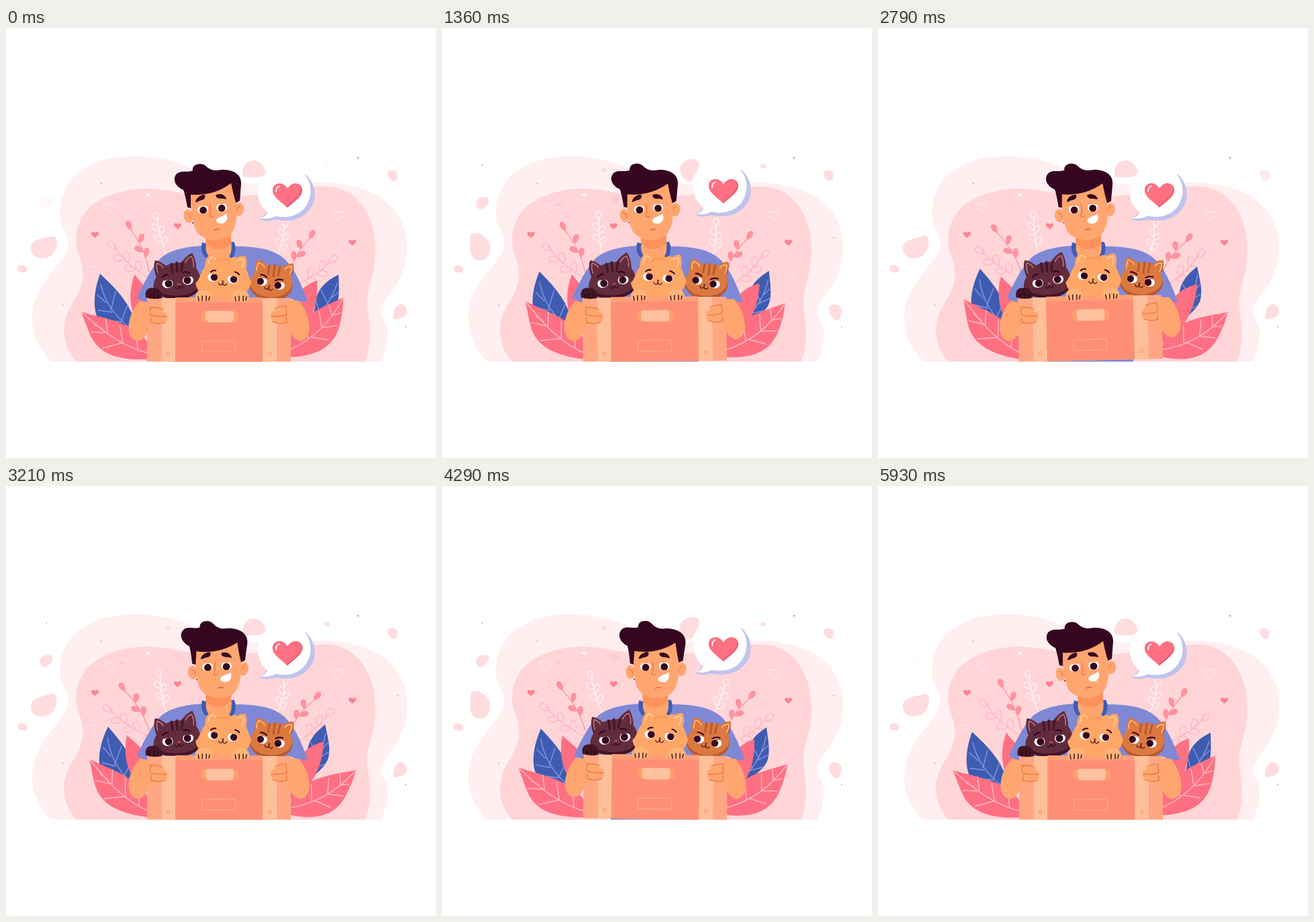
Write an HTML page with a canvas that moves like this. It is 640 px wide and 640 px high and loops after 6000 ms.

```html
<!DOCTYPE html>
<html lang="en">
<head>
<meta charset="utf-8">
<title>Kittens in a box</title>
<style>
html, body { margin: 0; width: 100%; height: 100%; overflow: hidden; background: #fff; }
canvas { display: block; width: 640px; height: 640px; }
</style>
</head>
<body>
<canvas id="stage" width="640" height="640"></canvas>
<script>
const ctx = document.getElementById('stage').getContext('2d');
const LOOP = 6000, HALF = 3000, TAU = Math.PI * 2;
const DARK = '#360520', SKIN = '#ffa670', SHADE = '#ff925a', FOLD = '#f4733f';
const BLUE = '#3e5cb2', SHIRT = '#7f88d5', ROSE = '#ff6f82', PALE = '#ffdcdf';

const cache = new Map();
function path(d) {
  if (!cache.has(d)) cache.set(d, new Path2D(d));
  return cache.get(d);
}
function fill(color, d) {
  ctx.fillStyle = color;
  ctx.fill(path(d));
}
function line(color, w, d) {
  ctx.strokeStyle = color;
  ctx.lineWidth = w;
  ctx.stroke(path(d));
}
function oval(color, x, y, rx, ry, deg = 0) {
  ctx.fillStyle = color;
  ctx.beginPath();
  ctx.ellipse(x, y, rx, ry, deg * TAU / 360, 0, TAU);
  ctx.fill();
}
function turn(x, y, deg, draw) {
  ctx.save();
  ctx.translate(x, y);
  ctx.rotate(deg * TAU / 360);
  ctx.translate(-x, -y);
  draw();
  ctx.restore();
}
function at(x, y, deg, scale, draw) {
  ctx.save();
  ctx.translate(x, y);
  ctx.rotate(deg * TAU / 360);
  ctx.scale(scale, scale);
  draw();
  ctx.restore();
}
// a shape with a darker rim along its lower edge
function shaded(rim, color, d) {
  fill(rim, d);
  ctx.save();
  ctx.clip(path(d));
  ctx.translate(0, -5);
  fill(color, d);
  ctx.restore();
}

const wave = (t, peak, span = LOOP) => Math.cos(TAU * (t - peak) / span);
const clamp = v => Math.max(0, Math.min(1, v));
const ease = v => v * v * (3 - 2 * v);
function keys(t, list) {
  let i = 0;
  while (i < list.length - 2 && t > list[i + 1][0]) i++;
  const [t0, a] = list[i], [t1, b] = list[i + 1];
  return a + (b - a) * ease(clamp((t - t0) / (t1 - t0)));
}
// 0 near the dip time, 1 away from it; repeats twice per loop
function fade(t, dip, hold = 60, ramp = 350) {
  const d = Math.abs(((t - dip) % HALF + HALF * 1.5) % HALF - HALF / 2);
  return ease(clamp((d - hold) / ramp));
}

const ROCK = [[0, 0], [1000, 0], [1800, -1.3], [2800, -1.3], [3600, 1.3], [3900, 1.3], [4700, 0], [6000, 0]];
const NOD = [[0, 0], [640, 2.2], [1930, 0], [2790, 0.8], [3600, 6], [3900, 6], [4790, 1.8], [6000, 0]];
const HEART = 'M0 9 C-4 5 -11 1 -11 -4 C-11 -10 -3 -11 0 -5 C3 -11 11 -10 11 -4 C11 1 4 5 0 9 Z';

function backdrop() {
  fill('#ffeff0', 'M67 496.500 C35 465 30 420 55 382 C75 350 95 340 92 315 C88 295 75 290 82 258 C92 210 140 191 190 191 C250 191 275 210 330 228 C390 238 420 230 470 230 C560 232 597 275 597 325 C597 370 575 390 563 408 C550 430 570 435 568 455 C568 475 563 485 559 496.500 Z');
  fill('#ffd5d8', 'M104 496.500 C82 470 82 440 96 415 C115 385 118 370 111 345 C100 320 103 295 118 274 C140 248 180 239 210 239 C240 240 260 246 290 250 C330 253 360 250 390 246 C420 240 455 235 480 236 C527 239 550 285 550 330 C550 370 536 385 538 415 C541 440 546 465 535 496.500 Z');
}

function speck(alpha, color, x, y, rx, ry = rx, deg = 0) {
  ctx.globalAlpha = alpha;
  oval(color, x, y, rx, ry, deg);
  ctx.globalAlpha = 1;
}

function confetti(t) {
  const swing = (1 - wave(t, 0, HALF)) / 2;
  turn(56, 327, -80 * swing, () => fill(PALE,
    'M37 326 C39 313 58 313 69 310 C78 309 77 322 74 329 C70 340 60 344 51 343 C41 341 36 335 37 326 Z'));
  turn(368, 211, -65 * swing, () => fill(PALE,
    'M352 217 C351 207 358 197 369 197 C379 198 386 207 386 215 C385 222 377 223 369 222 C362 221 353 225 352 217 Z'));
  turn(586, 423, -55 * swing, () => fill(PALE,
    'M576 427 C577 419 581 411 588 411 C594 411 597 418 597 424 C595 431 587 431 582 433 C578 434 575 432 576 427 Z'));
  const a = fade(t, 2840), b = fade(t, 2300, 280, 420), c = fade(t, 1830), d = fade(t, 680);
  ctx.globalAlpha = a;
  fill(PALE, 'M51 258 C53 252 62 250 69 253 C72 258 66 266 60 269 C53 272 50 265 51 258 Z');
  ctx.globalAlpha = 0.25 + 0.75 * b;
  fill(PALE, 'M568 215 C570 210 578 211 582 215 C584 222 581 228 577 228 C572 227 567 221 568 215 Z');
  ctx.globalAlpha = c;
  fill(PALE, 'M17 359 C18 352 24 351 29 355 C34 359 31 364 26 364 C21 364 17 363 17 359 Z');
  speck(a, PALE, 241, 211, 4, 3, 15);
  speck(a, PALE, 478, 205.5, 4, 3, 15);
  speck(a, '#ffc8cd', 174, 263.5, 4.5, 2.5, 10);
  speck(a, '#ffcdd1', 257, 255, 7, 6);
  speck(1 - c, '#ffc8cd', 390, 289.5, 4, 3);
  speck(1, '#fff0f1', 212, 248.5, 3.5, 2.4);
  speck(a, '#d3a9b3', 60, 204, 1.1);
  speck(a, '#d3a9b3', 583, 312, 1.1);
  speck(d, '#b8929f', 524, 193.3, 1.2);
  speck(d, '#d3a9b3', 142, 231, 1.1);
  speck(0.3 + 0.7 * c, '#d3a9b3', 84.5, 412.5, 1.1);
  speck(c, '#d3a9b3', 595, 444.5, 1.1);

  const early = 1 - fade(t, 680), late = 1 - fade(t, 1850);
  const small = (x, y, r) => at(x, y, r, 0.5, () => fill('#ff8290', HEART));
  small(132.5, 308, -16 * early);
  small(255.5, 295, -16 * late);
  small(515.5, 319.5, 14 * early);
  const hollow = (x, y, r, s) => at(x, y, r, s, () => line('#ffecee', 1.5, HEART));
  hollow(154, 268, -8 * early, 0.72);
  hollow(494, 279.5, 14 * late, 0.74);
  hollow(128, 360.5, 8 * early, 0.58);
  hollow(519, 372, -8 * late, 0.58);
}

// each sprig: place along the stem, tilt in radians
const SOLID = [[0.3, 0.6], [0.42, -0.6], [0.62, 0.75], [0.94, 0]];
const HOLLOW = [[0.24, 0.65], [0.34, -0.65], [0.54, 0.6], [0.64, -0.6], [0.9, -0.05]];

function twig(x, y, len, deg, bend, color, sprigs, size) {
  at(x, y, deg, 1, () => {
    ctx.strokeStyle = color;
    ctx.fillStyle = color;
    ctx.lineWidth = 1.3;
    ctx.beginPath();
    ctx.moveTo(0, 0);
    ctx.quadraticCurveTo(bend, -len / 2, 0, -len);
    ctx.stroke();
    for (const [u, tilt] of sprigs) {
      ctx.save();
      ctx.translate(2 * u * (1 - u) * bend, -len * u);
      ctx.rotate(tilt * (bend < 0 && sprigs === SOLID ? -1 : 1));
      ctx.beginPath();
      ctx.moveTo(0, 0);
      ctx.bezierCurveTo(-size * 0.42, -size * 0.4, -size * 0.32, -size, 0, -size);
      ctx.bezierCurveTo(size * 0.32, -size, size * 0.42, -size * 0.4, 0, 0);
      sprigs === HOLLOW ? ctx.stroke() : ctx.fill();
      ctx.restore();
    }
  });
}

function plants(t) {
  const lean = 1 - wave(t, 250);
  twig(213, 363, 72, -24 - 4.4 * lean, 9, '#ff929e', SOLID, 15);
  twig(214, 373, 74, -47 - 4 * lean, -9, '#ffb5bd', HOLLOW, 16);
  twig(238, 336, 56, -10.5 + 7.5 * wave(t, 1900), -4, '#fff3f3', HOLLOW, 13);
  twig(402, 342, 51, 14 - 8 * wave(t, 1600), 5, '#fff3f3', HOLLOW, 13);
  twig(423, 365, 62, 30 + 4.2 * lean, -9, '#ff929e', SOLID, 15);
  twig(430, 383, 67, 51 - 6.5 * wave(t, 2150), 8, '#ffb5bd', HOLLOW, 16);

  const sway = 1 - wave(t, 0);
  turn(215, 470, 3.2 * sway, () => {
    fill(BLUE, 'M140 366 C157 382 186 407 194 445 L207 470 C188 448 147 446 136 431 C128 411 133 385 140 366 Z');
    line('#8996dc', 1.4, 'M141 382 C148 410 163 432 198 457 M149 409 L136 397 M158 423 L137 420 M170 437 L146 436 M156 420 L163 393 M171 438 L181 412');
  });
  turn(420, 472, -5.2 * sway, () => {
    fill(BLUE, 'M495 367 C475 377 460 391 460 415 C458 432 440 450 424 466 C455 440 478 436 490 418 C498 404 495 382 495 367 Z');
    line('#8996dc', 1.4, 'M493 380 C485 405 470 427 432 456 M484 402 L494 394 M477 414 L493 408 M464 428 L484 425 M479 411 L469 390 M467 425 L461 405');
  });
  turn(212, 450, -3.2 + 5.7 * wave(t, 850), () =>
    fill(ROSE, 'M191 367 C199 379 219 395 221 415 L216 455 C188 444 177 405 191 367 Z'));
  turn(424, 470, 4.6 * (wave(t, 2300) + 0.74), () =>
    fill(ROSE, 'M463 376 C444 382 429 397 422 421 L420 470 C452 451 466 412 463 376 Z'));

  turn(212, 487, 5.9 + 7.4 * wave(t, 2300), () => {
    fill(ROSE, 'M111 423 C143 433 196 437 216 476 L216 493 C175 495 144 490 128 463 C120 447 117 436 111 423 Z');
    line('#ffb8bf', 1.5, 'M112 424 C141 449 171 475 216 485 M143 448 L131 442 M150 454 L126 453 M172 469 L144 477 M151 454 L148 433 M174 470 L169 443 M196 479 L193 453');
  });
  turn(424, 487, 7.2 * sway, () => {
    fill(ROSE, 'M502 401 C474 415 433 428 420 464 L420 490 C456 489 484 479 495 448 C500 431 502 416 502 401 Z');
    line('#ffb8bf', 1.5, 'M501 403 C485 434 459 463 420 480 M485 428 L498 424 M470 446 L493 443 M453 460 L479 464 M485 428 L481 413 M470 446 L466 422 M450 463 L443 438');
  });
}

function bubble(t) {
  ctx.save();
  ctx.translate(0, -3.3 * (1 - wave(t, 0, HALF)));
  fill('#bfc3ee', 'M446 218 C458 228 463 246 457 262 C448 281 429 291 401 285 C392 288 384 288 378 285 L420 240 Z');
  fill('#fff', 'M415 205 C440 207 454 223 453.500 243 C452 272 428 286 401 280 C394 284 386 285 379 283 C385 281 388 278 389 274 C370 260 372 232 384 218 C392 209 403 205 415 205 Z');
  at(419, 249.5, 0, 2 * (1 + 0.12 * (1 - fade(t, 680, 80, 480))), () => {
    fill('#f2566e', HEART);
    ctx.save();
    ctx.clip(path(HEART));
    ctx.translate(-1, -0.7);
    fill('#ff7182', HEART);
    ctx.restore();
    line('#fff', 0.9, 'M-8.4 -3 C-8.6 -5 -7.5 -6.6 -6 -7');
  });
  ctx.restore();
}

// lower part of an ellipse under a flat lid, with the pupil cut by the lid
function eye(x, y, dx, dy, r = 6, tilt = 0) {
  ctx.save();
  ctx.beginPath();
  ctx.ellipse(x, y, r + 2, r + 0.6, tilt, -0.85, Math.PI + 0.85);
  ctx.closePath();
  ctx.fillStyle = '#fff';
  ctx.fill();
  ctx.clip();
  oval(DARK, x + dx, y + dy, r - 0.5, r - 0.5);
  ctx.restore();
}

function neck() {
  fill(SKIN, 'M297 300 L334 300 L336 335 C328 346 303 346 297 335 Z');
  fill(SHADE, 'M297 308 L335 306 L335 320 C324 333 307 332 298 321 Z');
  fill(BLUE, 'M292 319 L298 321 C296 331 299 337 305 344 L296 341 C290 334 290 326 292 319 Z');
  fill(BLUE, 'M335 319 L339 318 C343 325 342 334 338 341 L330 344 C335 337 337 329 335 319 Z');
}

function face() {
  oval(SKIN, 271.5, 280, 7, 10, -12);
  oval(SKIN, 347, 270, 7, 10, 8);
  line(FOLD, 1.2, 'M269 276 Q275 276 275 283 M348 265 Q343 267 343 274');
  fill(DARK, 'M270 267 C268 255 266 247 264 241 C252 236 247 225 254 217 C261 211 270 216 278 212 C276 203 290 199 297 205 C304 212 311 213 320 211 C336 210 350 216 350 231 L348 257 L341 261 L310 258 L276 268 Z');
  fill(SKIN, 'M275 248 C298 250 319 243 335 231 C337 241 340 253 342 259 C345 278 343 295 336 305 C324 319 300 319 286 306 C279 298 277 281 275 265 Z');
  eye(293, 270, 0.5, 1.2, 5.9, -0.12);
  eye(321, 267, 0, 1.2, 5.9, -0.05);
  fill(DARK, 'M282 259 C283 253 288 249 295 248 C298 250 296 255 292 256 C288 256 285 260 282 259 Z');
  fill(DARK, 'M313 248 C319 246 326 248 328 254 C327 256 324 253 319 254 C314 254 311 250 313 248 Z');
  line(FOLD, 1.4, 'M303 262 Q306 271 303 280 Q305 283 309 280');
  line('#d95e3c', 1.4, 'M310 301 Q314 298 318 300');
  fill('#fff', 'M313 286 C315 281 324 280 328 276 C331 283 328 291 321 291 C316 291 313 290 313 286 Z');
  oval(DARK, 278, 290, 0.9, 0.9);
}

function man(nod) {
  fill(SHIRT, 'M292 324 C262 326 239 332 227 346 C215 360 205 380 195 401 Q202 407 212 408 L240 410 L250 500 L382 500 L400 410 L424 403 Q438 409 449 407 C438 377 426 350 407 338 C389 327 365 325 341 325 Z');
  neck();
  turn(312, 380, nod, face);
}

function mouth(color, x, y, deg) {
  at(x, y, deg, 1, () => {
    fill(color, 'M-2 -4 L2 -4 L0 -2 Z');
    line(color, 1.2, 'M-6 0 Q-5 4 -1 2 L0 -2 L1 2 Q5 4 6 0');
  });
}

function cats() {
  shaded('#421525', '#632c3c', 'M224 371 C221 362 219 353 222 346 C229 347 234 351 238 354 Q249 349 261 349 C266 342 272 337 277 335 C281 342 283 350 283 358 C290 367 292 380 287 389 C280 407 231 408 220 391 Q218 380 224 371 Z');
  line('#421525', 3, 'M246 351 L248 364 M254 349 L255 363 M263 349 L261 362');
  line('#d98c8c', 1.2, 'M226 365 Q223 357 225 350 Q231 352 234 357 M267 349 Q270 342 276 340 Q280 346 279 356');
  eye(240.5, 380.5, 1.5, 0, 6, -0.1);
  eye(271, 375.5, -1, 0, 6, -0.1);
  line(DARK, 2.2, 'M233 371 Q236 367 241 367 M264 364 Q269 362 273 365');
  mouth('#2f0b19', 257.5, 385, -8);
  fill('#e8516a', 'M254.500 381 L260 380 L257.500 383.500 Z');

  shaded('#b65a32', '#dc793f', 'M370 365 C370 357 371 350 374 345 C380 346 386 350 390 354 Q401 351 413 356 C418 351 423 350 428 351 C429 359 427 366 424 371 C431 385 424 400 407 404 C386 410 365 400 362 383 Q362 373 370 365 Z');
  line('#b65a32', 3, 'M392 354 L390 366 M400 353 L398 369 M408 355 L405 368');
  line('#ffd2a8', 1.2, 'M373 361 Q373 354 376 349 Q382 351 385 356 M415 359 Q420 354 425 355 Q426 361 422 367');
  eye(381, 377, -2.5, 0, 5.8, 0.25);
  eye(407, 383, -2.5, 0, 5.8, 0.1);
  line(DARK, 2.2, 'M379 367 Q384 367 388 371 M401 376 Q406 373 412 375');
  mouth('#4a1720', 391, 387, 14);

  fill('#ffa766', 'M296 356 C296 348 299 340 304 336 C308 336 312 338 315 341 Q319 334 324 340 Q331 335 334 343 Q339 339 344 342 Q350 338 356 339 C359 345 359 352 357 358 C361 366 362 372 365 378 C362 389 356 397 348 402 L302 404 C292 400 284 391 282 380 C289 374 289 364 296 356 Z');
  line('#ffd8b4', 1.3, 'M301 351 Q302 343 307 340 L312 344 M344 346 Q349 343 353 344 Q355 350 351 357');
  line('#f28a4d', 1.2, 'M315 348 Q318 341 324 347 Q329 341 333 348');
  eye(308, 371, 2, 0, 5.8, 0.1);
  eye(337.5, 374, 1.5, 0, 5.8, 0.1);
  line(DARK, 2.2, 'M305 363 Q308 360 312 361 M341 363 Q345 364 347 367');
  mouth('#4a1720', 322.5, 380, 5);
}

function paws() {
  fill('#421525', 'M208 401 C206 391 211 386 219 387 C227 386 233 392 232 402 Q220 405 208 401 Z');
  line('#23040f', 1.3, 'M214 396 L214 402 M220 395 L220 402 M226 396 L226 402');
  fill('#ffb478', 'M282 405 C280 395 286 390 294 390 C303 390 309 396 306 405 Q294 409 282 405 Z');
  fill('#ffb478', 'M337 405 C335 395 341 390 349 390 C358 390 364 396 361 405 Q349 409 337 405 Z');
  line(DARK, 1.4, 'M286 400 L287 406 M292 399 L292 406 M298 399 L298 406 M303 400 L302 405 M341 400 L342 406 M347 399 L347 406 M353 399 L353 406 M358 400 L357 405');
}

function box() {
  fill('#ffa782', 'M210 402 H424 V497 H210 Z');
  fill('#ffbf9b', 'M232 402 H252 V497 H232 Z M382 402 H403 V497 H382 Z');
  fill('#ff9f76', 'M252 401 H382 V409 H252 Z');
  fill('#ff8f74', 'M252 408.500 H382 V497 H252 Z');
  fill('#ffa06a', 'M298 421 H338 Q346 421 346 429 Q346 438 338 438 H298 Q290 438 290 429 Q290 421 298 421 Z');
  fill('#ffc29e', 'M300 421 H336 Q339 421 339 429 Q339 438 334 438 H302 Q297 437 297 429 Q297 421 300 421 Z');
  line('#ffb083', 1.2, 'M292 466 H340 Q341.500 466 341.500 468 V482 H293 Q291 482 291 480 Z');
  line('#fc8f5d', 1, 'M244.300 484.500 a2.300 2.300 0 1 1 -4.600 0 a2.300 2.300 0 1 1 4.600 0 M394.800 484.500 a2.300 2.300 0 1 1 -4.600 0 a2.300 2.300 0 1 1 4.600 0');
}

function hands() {
  fill(SKIN, 'M200 406 L212 409 C217 417 226 414 233 417 Q237 420 233 422 Q242 424 239 429 Q243 433 237 438 C232 443 222 441 215 441 C212 455 205 465 196 466 C185 464 181 452 183 439 C185 426 191 415 200 406 Z');
  line(FOLD, 1.3, 'M214 416 Q222 415 232 418 M215 427 Q226 430 239 429 M216 438 Q226 442 237 438 M216 417 Q213 421 215 427 M216 431 Q214 436 217 439');
  fill(SKIN, 'M436 406 L423 405 C419 414 409 414 402 416 Q397 418 400 421 Q391 424 395 429 Q392 433 398 437 C402 442 411 440 419 441 C422 455 429 464 438 466 C450 463 453 451 451 440 C449 426 443 415 436 406 Z');
  line(FOLD, 1.3, 'M418 414 Q410 413 401 417 M418 427 Q407 430 395 429 M418 438 Q408 442 397 437 M416 416 Q419 421 417 426 M417 431 Q419 435 417 439');
}

function scene(t) {
  ctx.clearRect(0, 0, 640, 640);
  ctx.lineCap = ctx.lineJoin = 'round';
  backdrop();
  confetti(t);
  ctx.save();
  ctx.beginPath();
  ctx.rect(0, 0, 640, 496.5);
  ctx.clip();
  plants(t);
  bubble(t);
  const rock = keys(t, ROCK);
  at(rock * 2.2, 0, 0, 1, () => man(keys(t, NOD)));
  // the box tips over whichever lower corner it rests on
  turn(rock < 0 ? 210 : 424, 497, rock, () => {
    cats();
    box();
    paws();
    hands();
  });
  ctx.restore();
}

const start = performance.now();
function tick() {
  scene((performance.now() - start) % LOOP);
  requestAnimationFrame(tick);
}
tick();
</script>
</body>
</html>
```
